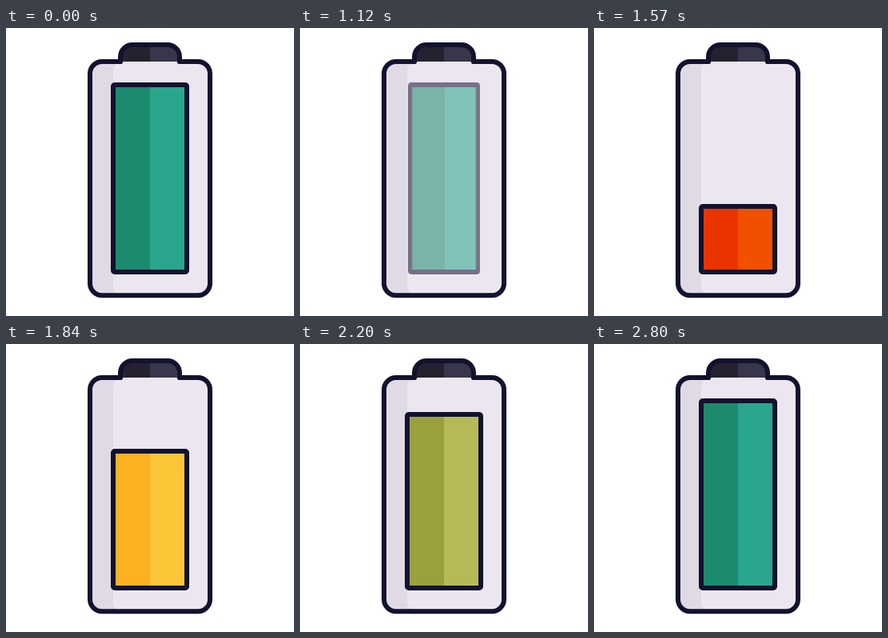
Write an HTML page without scripts that moves like this. It is 360 by 360 pixels and loops after 2830 ms.

```html
<!DOCTYPE html>
<html lang="en">
<head>
<meta charset="utf-8">
<title>Battery charging</title>
<style>
  html, body { margin: 0; width: 100%; height: 100%; overflow: hidden; background: #fff; }
  .stage { position: relative; width: 360px; height: 360px; overflow: hidden; }
  svg { position: absolute; inset: 0; }
  .line { fill: none; stroke: #12122f; stroke-width: 6; stroke-linecap: round; stroke-linejoin: round; }

  .level, .half { animation: 2830ms linear infinite; }
  .level {
    position: absolute; left: 131px; bottom: 52px;
    box-sizing: border-box; width: 98px; height: 240px;
    border: 6px solid #12122f; border-radius: 5px;
    background: #12122f;
    animation-name: squeeze, fade, grow;
  }
  .half { position: absolute; top: 0; bottom: 0; width: 50%; }
  .dark { left: 0; background: #1c8a6e; animation-name: dark; }
  .light { right: 0; background: #2aa68c; animation-name: light; }

  /* drained 1000-1447 ms, refilled 1447-2830 ms */
  @keyframes squeeze {
    0%, 35.34% { transform: scaleX(1); animation-timing-function: cubic-bezier(.333, 0, .667, .333); }
    51.12% { transform: scaleX(0); }
    51.13%, 100% { transform: scaleX(1); }
  }
  @keyframes fade {
    0%, 36.36% { opacity: 1; }
    36.39% { opacity: .8; }
    45.94% { opacity: .05; }
    46.64%, 51.12% { opacity: 0; }
    51.13%, 100% { opacity: 1; }
  }
  @keyframes grow {
    0%, 51.12% { height: 240px; }
    51.13% { height: 6px; animation-timing-function: cubic-bezier(.16, .8, .44, 1); }
    100% { height: 240px; }
  }
  @keyframes dark {
    0%, 51.12% { background: #1c8a6e; }
    51.13%, 55.48% { background: #eb3300; }
    64.66% { background: #ffb221; }
    77.74% { background: #9aa03c; }
    97.88%, 100% { background: #1c8a6e; }
  }
  @keyframes light {
    0%, 51.12% { background: #2aa68c; }
    51.13%, 55.48% { background: #f05000; }
    64.66% { background: #ffc638; }
    77.74% { background: #b6ba56; }
    97.88%, 100% { background: #2aa68c; }
  }
</style>
</head>
<body>
<div class="stage">
  <svg width="360" height="360" viewBox="0 0 360 360">
    <rect x="105" y="42" width="150" height="292.3" rx="15" fill="#e0dae5"/>
    <path d="M146 42H240a15 15 0 0 1 15 15V319.3a15 15 0 0 1-15 15H146a12 12 0 0 1-12-12V54a12 12 0 0 1 12-12z" fill="#ebe6f0"/>
    <path d="M180 21H158a15 15 0 0 0-15 15V42H180z" fill="#25222f"/>
    <path d="M180 21H202a15 15 0 0 1 15 15V42H180z" fill="#38364a"/>
    <path class="line" d="M143 42H120a15 15 0 0 0-15 15V319.3a15 15 0 0 0 15 15H240a15 15 0 0 0 15-15V57a15 15 0 0 0-15-15H217"/>
    <path class="line" d="M143 42V36a15 15 0 0 1 15-15H202a15 15 0 0 1 15 15V42"/>
  </svg>
  <div class="level">
    <div class="half dark"></div>
    <div class="half light"></div>
  </div>
</div>
</body>
</html>
```
